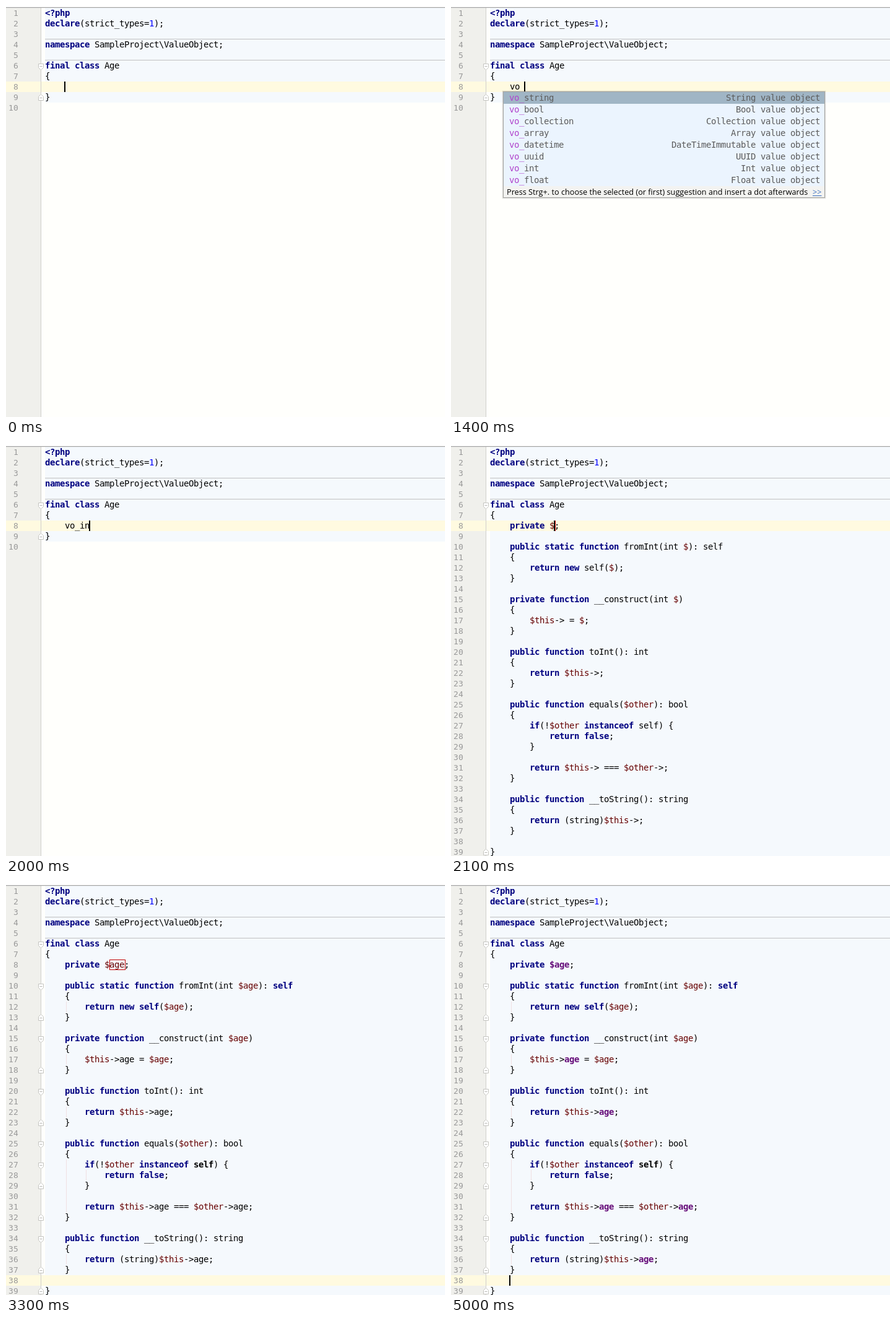
An HTML page that plays this animation: 709x664 px, repeating every 5.4 s.

```html
<!DOCTYPE html>
<html lang="en">
<head>
<meta charset="utf-8">
<title>Editor template</title>
<style>
  html, body { margin: 0; width: 100%; height: 100%; overflow: hidden; background: #fffffc; }
  #stage { position: relative; width: 709px; height: 664px; overflow: hidden; background: #fffffc; }
  #stage div, pre, svg { position: absolute; margin: 0; }
  pre, .row {
    font: 14px/17px "DejaVu Sans Mono", monospace;
    letter-spacing: calc(8px - 1ch);
    white-space: pre;
    color: #000;
  }
  .gutter { left: 0; top: 3px; width: 56px; height: 661px; background: #f0f0ec; }
  .php { left: 63px; top: 3px; width: 646px; background: #f5f9fd; }
  .current { left: 0; width: 709px; height: 17px; background: #fffae0; }
  .edge { left: 56px; top: 3px; width: 1px; height: 661px; background: #cfcfcc; }
  .top { left: 0; top: 0; width: 709px; height: 2px; background: #fafafa; border-bottom: 1px solid #999; }
  .rule { left: 63px; width: 646px; height: 1px; background: #c0c0c0; }
  pre.code { left: 63px; top: 3px; }
  pre.numbers { left: 0; top: 3px; width: 20px; text-align: right; font-size: 13px; color: #999; }
  b { font-weight: bold; color: #000080; }
  b.plain { color: #000; }
  b.field { color: #660e7a; }
  i { font-style: normal; }
  .var { color: #660000; }
  .num { color: #0000ff; }
  .slot { box-sizing: border-box; left: 167px; top: 122px; height: 17px; border: 1px solid #c00000; }
  .caret { width: 2px; height: 17px; background: #000; }
  #stage .popup {
    left: 84px; top: 138px; width: 518px;
    border: 1px solid #a3a3a0; background: #f0f0ee; box-shadow: 0 0 1px 1px rgba(0, 0, 0, .14);
  }
  #stage .popup > .row {
    position: relative; box-sizing: border-box; display: flex; justify-content: space-between;
    height: 19px; line-height: 19px; padding: 0 7px 0 9px; background: #ebf4fe; color: #5c5c5c;
  }
  #stage .popup > .row:first-child { background: #a0b5c5; }
  .hit { color: #b044cc; }
  #stage .hint {
    position: relative; height: 18px; padding-left: 5px; background: #f3f3f1; color: #000;
    font: 12.7px/18px "Open Sans", "Noto Sans", sans-serif; white-space: pre;
  }
  .hint u { position: absolute; left: 499px; color: #3c70c0; }
  #stage .pi {
    box-sizing: border-box; left: 504px; top: 1px; width: 14px; height: 17px; border: 1px solid #a9c3d8;
    background: #f1f6fa; color: #2f6799; line-height: 15px; text-align: center;
  }
  #stage .rest { position: relative; height: 38px; background: #a9a9a6; }
</style>
</head>
<body>
<div id="stage"></div>
<script>
const LOOP = 5400, ROW = 17, CELL = 8, LEFT = 63;
const stage = document.getElementById('stage');

const head = String.raw`<?php
declare(strict_types=1);

namespace SampleProject\ValueObject;

final class Age
{
`;

// "@" is the typed name, "~" puts a wave under the next character
const body = `    private~ $@~;

    public static function fromInt(int $@~): self
    {
        return new self($@~);
    }

    private function __construct(int $@~)
    {
        $this->@~ = $@~;
    }

    public function toInt(): int
    {
        return $this->@~;
    }

    public function equals($other): bool
    {
        if(!$other instanceof self) {
            return false;
        }

        return $this->@~ === $other->@~;
    }

    public function __toString(): string
    {
        return (string)$this->@~;
    }

}`;

const suggestions = [
  ['string', 'String'], ['bool', 'Bool'], ['collection', 'Collection'], ['array', 'Array'],
  ['datetime', 'DateTimeImmutable'], ['uuid', 'UUID'], ['int', 'Int'], ['float', 'Float']
];

const OPEN = [6, 10, 15, 20, 25, 27, 34], CLOSE = [13, 18, 23, 29, 32, 37, 39];
const GUIDES = [[12, 12, 4], [17, 17, 4], [22, 22, 4], [27, 31, 4], [28, 28, 8], [36, 36, 4]];

// Each step changes only the listed parts of the state
const steps = [
  [0, { typed: '', line: 8, caret: true }],
  [1100, { typed: 'vo', popup: 'loading' }],
  [1200, { popup: 'all' }],
  [1400, { typed: 'vo_' }],
  [1500, { typed: 'vo_i', popup: 'one' }],
  [1700, { typed: 'vo_in' }],
  [2000, { popup: null }],
  [2100, { name: '', slot: true }],
  [2400, { parsed: true, errors: true }],
  [2600, { name: 'a' }],
  [2900, { name: 'ag' }],
  [3000, { name: 'age' }],
  [3100, { errors: false }],
  [3300, { line: 38, caret: false }],
  [3400, { caret: true }],
  [3700, { slot: false, fields: true }],
  [4500, { caret: false }],
  [5000, { caret: true }]
];
let last = {};
const states = steps.map(([at, change]) => [at, last = { ...last, ...change }]);

const rowTop = n => 3 + ROW * (n - 1);
const colX = c => LEFT + CELL * c;
const box = (cls, style = '', inner = '') => `<div class="${cls}" style="${style}">${inner}</div>`;

const TOKENS = /<\?php|instanceof self|\bself\b|\$@|->@|\$\w+|\b(?:declare|namespace|final|class|private|public|static|function|return|new|if|instanceof|false)\b|\b\d+/g;

function highlight(text, s) {
  let first = true;
  return text.replace(/~/g, '').replace(TOKENS, t => {
    if (t === '<?php') return '<b>&lt;?php</b>';
    if (t === 'instanceof self') {
      return '<b>instanceof</b> ' + (s.parsed ? '<b class="plain">self</b>' : 'self');
    }
    if (t === 'self') return s.parsed ? '<b>self</b>' : t;
    if (t === '->@') return s.fields ? `-&gt;<b class="field">${s.name}</b>` : '-&gt;' + s.name;
    if (t === '$@') {
      const declared = first && s.fields;
      first = false;
      return declared ? `<b class="field">$${s.name}</b>` : `<i class="var">$${s.name}</i>`;
    }
    if (t[0] === '$') return `<i class="var">${t}</i>`;
    if (/\d/.test(t)) return `<i class="num">${t}</i>`;
    return `<b>${t}</b>`;
  });
}

function fold(row, up) {
  const y = rowTop(row) + (up ? 3.5 : 5.5);
  const shape = up ? 'l4 4v6h-8v-6z' : 'h4v6l-4 4l-4 -4v-6z';
  const dash = y + (up ? 6 : 4);
  return `<path d="M56.5 ${y}${shape}" fill="#fff" stroke="#c4c4c0"/>` +
    `<path d="M54.5 ${dash}h4" stroke="#b4b4b0"/>`;
}

function waves(name) {
  let d = '';
  body.split('\n').forEach((line, i) => {
    const text = line.replace(/@/g, name);
    let col = 0;
    for (const ch of text) {
      if (ch === '~') d += `M${colX(col)} ${rowTop(i + 8) + 16}l2 -2l2 2l2 -2l2 2`;
      else col++;
    }
  });
  return `<path d="${d}" fill="none" stroke="#e02020" stroke-width=".9"/>`;
}

function marks(s, expanded) {
  let out = '';
  if (s.parsed) {
    for (const [a, b, c] of GUIDES) {
      out += `<path d="M${colX(c) + 2.5} ${rowTop(a)}V${rowTop(b + 1)}" stroke="#f0e0e2"/>`;
    }
  }
  const opens = s.parsed ? OPEN : [6];
  const closes = s.parsed ? CLOSE : [expanded ? 39 : 9];
  out += opens.map(r => fold(r, false)).join('') + closes.map(r => fold(r, true)).join('');
  if (s.errors) out += waves(s.name);
  return `<svg width="709" height="664">${out}</svg>`;
}

function popup(s) {
  const loading = s.popup === 'loading';
  const list = s.popup === 'one' ? suggestions.filter(([k]) => k === 'int') : suggestions;
  const rows = list.map(([key, kind]) => {
    const label = 'vo_' + key, n = s.typed.length;
    return box('row', loading ? 'width:504px' : '',
      `<span><i class="hit">${label.slice(0, n)}</i>${label.slice(n)}</span><span>${kind} value object</span>`);
  }).join('');
  const hint = 'Press Strg+. to choose the selected (or first) suggestion and insert a dot afterwards<u>&gt;&gt;</u>';
  return box('popup', '', rows + box('hint', '', hint + (loading ? box('pi', '', 'π') : '')) +
    (loading ? box('rest') : ''));
}

function draw(s) {
  const expanded = s.name !== undefined;
  const code = head + (expanded ? body : `    ${s.typed}\n}`);
  const count = expanded ? 39 : 10;
  const numbers = Array.from({ length: count }, (_, i) => i + 1).join('\n');
  const y = rowTop(s.line);
  let col = 4;
  if (s.line === 8) col = expanded ? 13 + s.name.length : 4 + s.typed.length;

  stage.innerHTML =
    box('gutter') +
    box('php', `height:${expanded ? 661 : 153}px`) +
    box('current', `top:${y}px`) +
    box('edge') + box('top') +
    box('rule', 'top:53px') + box('rule', 'top:87px') +
    `<pre class="numbers">${numbers}</pre>` +
    `<pre class="code">${highlight(code, s)}</pre>` +
    marks(s, expanded) +
    (s.slot ? box('slot', `width:${s.name.length * CELL + 2}px`) : '') +
    (s.caret ? box('caret', `left:${colX(col) - 1}px;top:${y}px`) : '') +
    (s.popup ? popup(s) : '');
}

const start = performance.now();
let shown = null;
function tick() {
  const t = Math.max(0, performance.now() - start) % LOOP;
  let state = states[0][1];
  for (const [at, next] of states) if (t >= at) state = next;
  if (state !== shown) draw(shown = state);
  requestAnimationFrame(tick);
}
tick();
</script>
</body>
</html>
```
